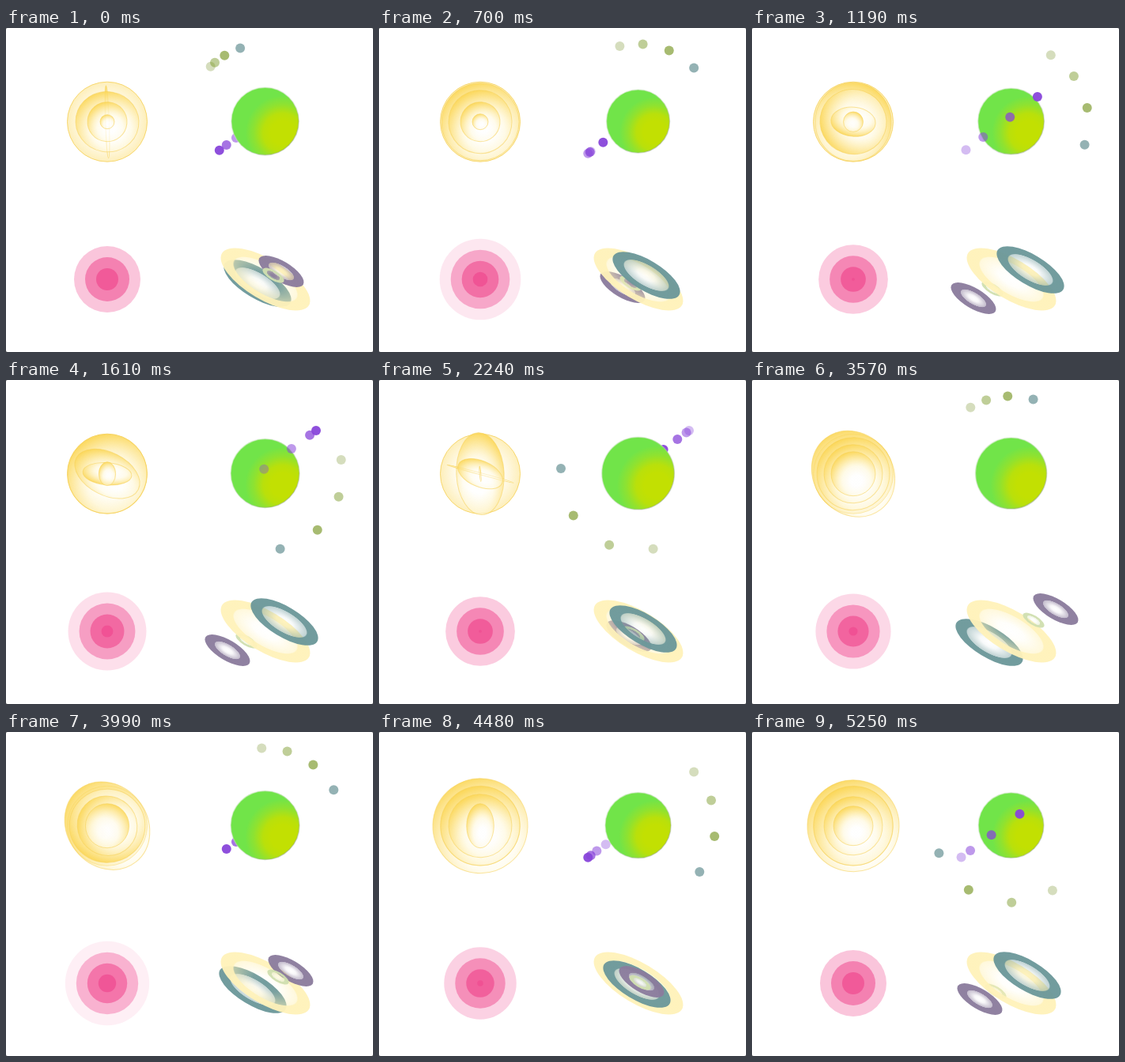
An HTML page with a canvas that plays this animation: 464x410 px, repeating every 5320 ms.

```html
<!DOCTYPE html>
<html>
<head>
<meta charset="utf-8">
<style>
html, body { margin: 0; width: 100%; height: 100%; overflow: hidden; background: #666; }
canvas { display: block; background: #fff; border-radius: 2px; }
</style>
</head>
<body>
<canvas id="stage" width="464" height="410"></canvas>
<script>
const ctx = document.getElementById('stage').getContext('2d');
const TAU = Math.PI * 2, LOOP = 5320, STEP = 70, SECOND = 1050, LAG = 210;

const mod = (a, n) => ((a % n) + n) % n;
const mix = (a, b, k) => a + (b - a) * k;
const rad = deg => deg * Math.PI / 180;
const rgba = (rgb, a) => `rgba(${rgb},${a})`;

// Cubic bezier easing with control points (x1, 0) and (x2, 1)
function bezier(x1, x2) {
  return x => {
    let lo = 0, hi = 1;
    for (let i = 0; i < 24; i++) {
      const s = (lo + hi) / 2, r = 1 - s;
      if (3 * r * r * s * x1 + 3 * r * s * s * x2 + s ** 3 < x) lo = s; else hi = s;
    }
    return lo * lo * (3 - 2 * lo);
  };
}
const easeIn = bezier(.42, 1), easeInOut = bezier(.42, .58);

// Goes from 0 to 1 and back, 2 seconds each way
function swing(t) {
  const p = mod(t, 4 * SECOND) / (2 * SECOND);
  return p < 1 ? p : 2 - p;
}

function circle(x, y, r, fill) {
  ctx.fillStyle = fill;
  ctx.beginPath();
  ctx.arc(x, y, r, 0, TAU);
  ctx.fill();
}

function withStops(gradient, stops) {
  for (const [at, color] of stops) gradient.addColorStop(at, color);
  return gradient;
}
const radial = (x, y, r0, r1, stops) =>
  withStops(ctx.createRadialGradient(x, y, r0, x, y, r1), stops);

// --- Gyroscope: radius, tilt and spin (degrees) of each disc over time ---
const TIMES = [0, 700, 1610, 2940, 3570, 4480, 5250];
const GYRO = [
  { r: [46, 49, 50, 54, 57, 60, 58], tilt: [88, 90, 88, 86, 52, 52, 52], spin: [87, 360, 720, 985, 1051, 1440, 1800] },
  { r: [40, 40, 44, 43, 46, 50, 50], tilt: [10, 10, 27, 2, 2, 2, 2], spin: [18, 360, 668, 971, 1080, 1440, 1800] },
  { r: [25, 25, 31, 29, 37, 40, 37], tilt: [5, 5, 5, 43, 43, 43, 43], spin: [0, 360, 603, 970, 1080, 1440, 1800] },
  { r: [9, 10, 15, 4, 28, 28, 25], tilt: [90, 90, 90, 80, 90, 90, 90], spin: [0, 360, 675, 970, 1080, 1492, 1800] }
];

function keyed(list, t) {
  let i = 0;
  while (i < TIMES.length - 2 && t >= TIMES[i + 1]) i++;
  return mix(list[i], list[i + 1], (t - TIMES[i]) / (TIMES[i + 1] - TIMES[i]));
}

// The yellow side of a disc faces the upper left while it lies flat
function gyroDisc(r, tilt, spin) {
  const a = rad(tilt), c = Math.cos(rad(spin));
  const flat = Math.sign(c) * Math.max(.02, Math.abs(c));
  const gx = .15 * Math.cos(a) + .3 * Math.sin(a);
  const gy = .3 * Math.cos(a) - .15 * Math.sin(a);
  ctx.save();
  ctx.translate(128, 118.7);
  ctx.rotate(a);
  ctx.save();
  ctx.scale(r, r * flat);
  circle(0, 0, 1, radial(gx, gy, .25, 1.33, [
    [0, 'rgba(255,255,255,.5)'], [.35, 'rgba(255,250,228,.5)'], [1, 'rgba(251,214,85,.9)']
  ]));
  ctx.restore();
  ctx.strokeStyle = 'rgba(246,208,85,.55)';
  ctx.beginPath();
  ctx.ellipse(0, 0, r, r * Math.abs(flat), 0, 0, TAU);
  ctx.stroke();
  ctx.restore();
}

function drawGyro(t) {
  circle(128, 118.7, 50.5, radial(128, 118.7, 24, 51, [
    [0, 'rgba(252,222,115,0)'], [1, 'rgba(252,222,115,.5)']
  ]));
  ctx.strokeStyle = 'rgba(246,208,85,.8)';
  ctx.stroke();
  for (const d of GYRO) gyroDisc(keyed(d.r, t), keyed(d.tilt, t), keyed(d.spin, t));
}

// --- Green ball with two trains of dots ---
const BALL = { x: 327.5, y: 118 };

function drawBall(t) {
  const { x, y } = BALL, r = 40 + 8 * swing(t - 700);
  const cx = x + r * .52, cy = y + r * .34;
  circle(x, y, r, radial(cx, cy, r * .35, r * 1.1, [
    [0, '#c2e002'], [.3, '#b9e00b'], [.65, '#8fe230'], [1, '#71e449']
  ]));
  // Light rim on the left, shaded rim on the right
  ctx.strokeStyle = withStops(ctx.createLinearGradient(x - r, y - r, x + r, y + r), [
    [0, 'rgba(235,248,230,.7)'], [.5, 'rgba(200,215,190,.4)'], [1, 'rgba(110,130,100,.45)']
  ]);
  ctx.lineWidth = 1.5;
  ctx.stroke();
  ctx.lineWidth = 1;
}

function shuttle(t, i) {
  const p = mod(t - 360 - i * LAG, 4 * SECOND) / (4 * SECOND);
  let q;
  if (p < .3) q = easeInOut(p / .3);
  else if (p < .6) q = mix(1, .48, easeInOut((p - .3) / .3));
  else q = .48 * (1 - easeInOut((p - .6) / .4));
  return { x: 264 + 128 * q, y: 159 - 95 * q, front: p < .3 };
}

function drawShuttles(t, front) {
  [.95, .75, .55, .36].map((a, i) => [a, shuttle(t, i)]).reverse().forEach(([a, s]) => {
    if (s.front === front) circle(s.x, s.y, 6, rgba('136,70,218', a));
  });
}

function drawOrbit(t) {
  const colors = [['70,122,126', .58], ['115,148,30', .63], ['115,148,30', .46], ['115,143,35', .3]];
  for (let i = 3; i >= 0; i--) {
    const p = mod(t + 687 - i * LAG, 3 * SECOND) / (3 * SECOND);
    const a = (easeIn(p) - .125) * TAU;
    circle(BALL.x + 97.7 * Math.sin(a), BALL.y - 97.7 * Math.cos(a), 6, rgba(...colors[i]));
  }
}

// --- Pink ripples ---
function drawRipples(t) {
  const u = mod(t / SECOND, 1);
  for (let i = 3; i >= 0; i--) {
    const k = (i + u) / 4;
    circle(128, 318, 56 * k, rgba('240,80,147', Math.pow(1 - k, .8)));
  }
}

// --- Tilted sliding discs ---
function plate(x, y, size, rgb, hole, inner) {
  ctx.save();
  ctx.translate(x, y);
  ctx.rotate(rad(31));
  ctx.scale(64.1 * size, 25.3 * size);
  circle(0, 0, 1, radial(0, 0, 0, 1, [
    [0, rgba(rgb, 0)], [hole * .4, rgba(rgb, inner * .12)], [hole, rgba(rgb, inner)],
    [hole + .03, rgba(rgb, .96)], [1, rgba(rgb, .96)]
  ]));
  ctx.restore();
}

function drawPlates(t) {
  const d = 120 * swing(t + 700) - 60;
  const at = k => [328 + d * k, 318 - d * k / 2];
  const teal = () => plate(...at(.5), .755, '108,152,154', .65, .42);
  const violet = () => {
    plate(...at(-1), .505, '139,124,157', .55, .5);
    plate(...at(-.5), .24, '208,223,176', .6, .4);
  };
  const tealFront = d > -5, violetFront = d < 5;
  if (!violetFront) violet();
  if (!tealFront) teal();
  plate(328, 318, 1, '255,242,186', .7, .5);
  if (tealFront) teal();
  if (violetFront) violet();
}

function frame(now) {
  const t = Math.floor(mod(now - start, LOOP) / STEP) * STEP;
  ctx.clearRect(0, 0, 464, 410);
  drawGyro(t);
  drawOrbit(t);
  drawShuttles(t, false);
  drawBall(t);
  drawShuttles(t, true);
  drawRipples(t);
  drawPlates(t);
  requestAnimationFrame(frame);
}
const start = performance.now();
frame(start);
</script>
</body>
</html>
```
